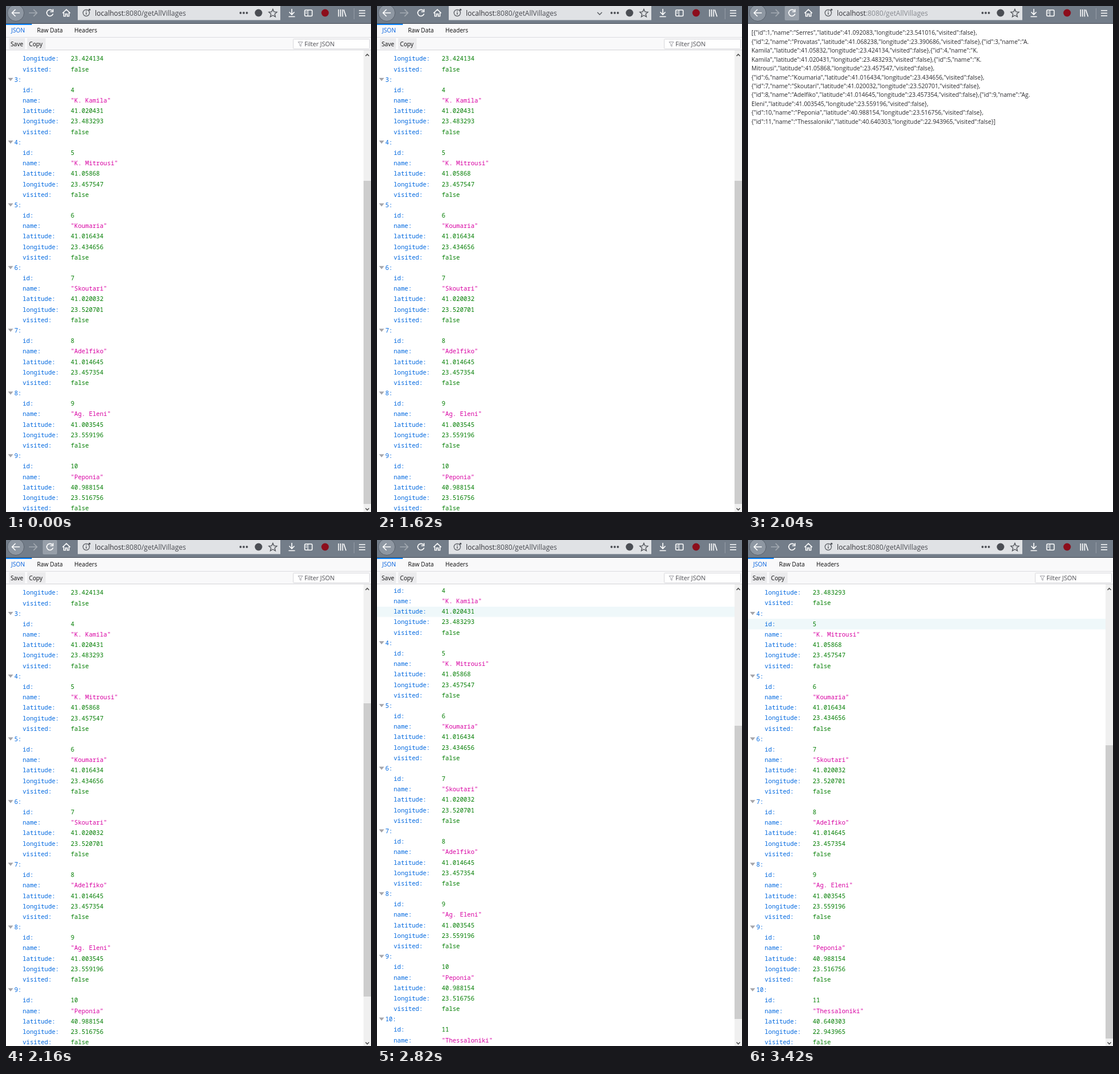
Write an HTML page that moves like this. It is 636 px wide and 880 px high and loops after 4140 ms.

```html
<!DOCTYPE html>
<html lang="en">
<head>
<meta charset="utf-8">
<title>JSON viewer reload</title>
<style>
html, body { margin: 0; width: 100%; height: 100%; overflow: hidden; background: #fff; }
svg { display: block; width: 636px; height: 880px; }
text { white-space: pre; }
.ui { font: 10.2px "Open Sans", sans-serif; fill: #0c0c0d; }
.url { font: 12px "Open Sans", sans-serif; fill: #303035; }
.raw { font: 10.27px "Open Sans", sans-serif; fill: #2a2a2e; }
.row { font: 10.58px "Noto Sans Mono", "DejaVu Sans Mono", monospace; }
.key { fill: #0068e0; }
.num { fill: #007d00; }
.str { fill: #d800a2; }
.line { fill: none; stroke: #fff; stroke-width: 1.6; }
.dark { stroke: #55585e; stroke-width: 1.4; }

.chevron, .hot, .path, .viewer, .page, .list, .hover, .thumb {
  animation: 4140ms step-end infinite;
}
.chevron { animation-name: chevron; }
.hot { animation-name: hot; }
.path { animation-name: path; }
.viewer { animation-name: viewer; }
.page { animation-name: page; }
.list { animation-name: scroll; }
.hover { animation-name: hover; }
.thumb { animation-name: thumb; }

@keyframes chevron {
  0%, 40.57% { opacity: 0; }
  36.23% { opacity: .4; }
  37.68% { opacity: .8; }
  39.13% { opacity: 1; }
}
@keyframes hot {
  0%, 60.86% { opacity: 0; }
  40.57%, 59.42% { opacity: .5; }
  42.02% { opacity: 1; }
}
@keyframes path {
  0%, 52.17% { fill: #4a4c52; }
  46.37% { fill: #86898f; }
}
@keyframes viewer {
  0%, 52.17% { visibility: visible; }
  47.82% { visibility: hidden; }
}
@keyframes page {
  0%, 52.17% { visibility: hidden; }
  47.82% { visibility: visible; }
}
@keyframes scroll {
  0% { transform: translateY(0); }
  65.21% { transform: translateY(-2px); }
  66.66% { transform: translateY(-27px); }
  68.11% { transform: translateY(-58px); }
  69.56% { transform: translateY(-84px); }
  71.01% { transform: translateY(-101px); }
  73.91%, 100% { transform: translateY(-109.1px); }
}
/* row under the pointer, in list coordinates */
@keyframes hover {
  0% { opacity: 0; transform: translateY(155.4px); }
  65.21% { opacity: 1; transform: translateY(155.4px); }
  68.11% { opacity: 1; transform: translateY(173.6px); }
  69.56% { opacity: 1; transform: translateY(209.9px); }
  71.01% { opacity: 1; transform: translateY(228.1px); }
  73.91%, 100% { opacity: 1; transform: translateY(246.3px); }
}
@keyframes thumb {
  0% { y: 304px; height: 562px; }
  52.17% { y: 284px; height: 510px; }
  65.21% { y: 285px; height: 510px; }
  66.66% { y: 302px; height: 510px; }
  68.11% { y: 323px; height: 510px; }
  69.56% { y: 340px; height: 510px; }
  71.01% { y: 352px; height: 510px; }
  73.91%, 100% { y: 357px; height: 510px; }
}
</style>
</head>
<body>
<svg viewBox="0 0 636 880">
  <defs>
    <clipPath id="panel"><rect y="77" width="623" height="803"/></clipPath>
  </defs>
  <rect width="636" height="880" fill="#fff"/>

  <g class="viewer">
    <g clip-path="url(#panel)">
      <g class="list" id="list">
        <rect class="hover" width="623" height="18.2" fill="#eff8fa"/>
      </g>
    </g>
    <rect y="31" width="636" height="46" fill="#f9f9fa"/>
    <rect y="54" width="636" height="1" fill="#dcdce0"/>
    <rect y="76" width="636" height="1" fill="#d4d4d8"/>
    <rect y="31" width="45" height="2" fill="#0a84ff"/>
    <g class="ui">
      <text x="9" y="46" style="fill:#0060df">JSON</text>
      <text x="54" y="46">Raw Data</text>
      <text x="119" y="46">Headers</text>
      <path d="M5 56h28v19H5zM37 56h32v19H37z" fill="#ebebed"/>
      <text x="8" y="69.6">Save</text>
      <text x="40" y="69.6">Copy</text>
      <rect x="500.5" y="57.5" width="133" height="17" rx="1" fill="#fff" stroke="#d7d7db"/>
      <path d="M509 62.5h8l-3 3.7v4l-2-1.2v-2.8z" fill="none" stroke="#a0a0a6"/>
      <text x="520" y="69.6" style="font-size:10.6px;fill:#4a4a50">Filter JSON</text>
    </g>
    <rect x="623" y="77" width="13" height="803" fill="#f0f0f0"/>
    <rect class="thumb" x="623" y="304" width="13" height="562" fill="#cdcdcd"/>
    <path d="M626.5 87l3-3 3 3M626.5 873.5l3 3 3-3" fill="none" stroke="#505050" stroke-width="1.6"/>
  </g>

  <g class="page raw" id="raw"></g>

  <rect width="636" height="30" fill="#737d89"/>
  <rect y="30" width="636" height="1" fill="#454b54"/>
  <rect x="125" width="353" height="24.5" fill="#e0e2e5"/>
  <rect class="hot" x="64" width="25" height="25" rx="2" fill="#979fa9"/>

  <circle cx="17" cy="12" r="14.5" fill="#8e97a2" stroke="#59616c"/>
  <g class="line">
    <path d="M24 12H10.5M16.5 6l-6 6 6 6"/>
    <path d="M40 12h13.5M48 6l6 6-6 6" opacity=".35"/>
    <path d="M80.8 8.2A5.6 5.6 0 1 0 82 13.5M82 5.5v4.5h-4.8"/>
    <path d="M98.5 12.5l6.7-6.5 6.7 6.5M100.7 11.5v6.3h3v-4h3v4h3v-6.3"/>
    <path d="M498 5v9.500M493.5 10.5l4.5 4.5 4.5-4.5M492.5 18.5h11"/>
    <rect x="520.5" y="7" width="13" height="10.5" rx="1.5"/>
    <path d="M526 7v10.5M522 10h2.5M522 12.5h2.5" stroke-width="1.2"/>
    <path d="M579.5 6v12.5M583 6v12.5M586.5 6v12.5M588.5 6.5l4 12"/>
    <path d="M615 8h11M615 12.5h11M615 17h11"/>
    <path d="M606.5 4v19" stroke-width="1" opacity=".25"/>
  </g>
  <circle cx="556" cy="12" r="6.5" fill="#8c0d1b"/>

  <g class="line dark">
    <circle cx="139.8" cy="12" r="5.6" stroke-width="1.2"/>
    <path d="M139.8 11v4M139.8 8v1.5"/>
    <path class="chevron" d="M384 11l4 4 4-4"/>
    <path d="M465 5.5l2 4.6 5 .5-3.8 3.3 1.2 4.9-4.4-2.6-4.4 2.6 1.2-4.9-3.8-3.3 5-.5z"/>
  </g>
  <circle cx="145.5" cy="6.5" r="1.8" fill="#55585e"/>
  <g fill="#4b4e54">
    <circle cx="408.7" cy="12" r="1.9"/>
    <circle cx="414.2" cy="12" r="1.9"/>
    <circle cx="419.7" cy="12" r="1.9"/>
    <circle cx="440" cy="12" r="6.5"/>
  </g>
  <text class="url" x="155" y="17.3">localhost<tspan class="path">:8080/getAllVillages</tspan></text>
</svg>
<script>
const villages = [
  ["Serres", 41.092083, 23.541016],
  ["Provatas", 41.068238, 23.390686],
  ["A. Kamila", 41.05832, 23.424134],
  ["K. Kamila", 41.020431, 23.483293],
  ["K. Mitrousi", 41.05868, 23.457547],
  ["Koumaria", 41.016434, 23.434656],
  ["Skoutari", 41.020032, 23.520701],
  ["Adelfiko", 41.014645, 23.457354],
  ["Ag. Eleni", 41.003545, 23.559196],
  ["Peponia", 40.988154, 23.516756],
  ["Thessaloniki", 40.640303, 22.943965]
].map(([name, latitude, longitude], i) =>
  ({ id: i + 1, name, latitude, longitude, visited: false }));

const NS = "http://www.w3.org/2000/svg";
const ROW = 18.18;
const list = document.getElementById("list");
const raw = document.getElementById("raw");

function add(parent, tag, attrs, content = "") {
  const el = document.createElementNS(NS, tag);
  for (const k in attrs) el.setAttribute(k, attrs[k]);
  el.textContent = content;
  parent.append(el);
}

// Tree rows; the first two villages are scrolled out of view.
villages.slice(2).forEach((village, n) => {
  let y = 18.92 + n * 6 * ROW;
  add(list, "path", { d: `M3.5 ${y - 3}h9l-4.5 5.500z`, fill: "#a5a5aa" });
  add(list, "text", { class: "row key", x: 14.5, y: y + 3.7 }, `${n + 2}:`);
  for (const [key, value] of Object.entries(village)) {
    y += ROW;
    const type = typeof value === "string" ? "str" : "num";
    add(list, "text", { class: "row key", x: 29, y: y + 3.7 }, key + ":");
    add(list, "text", { class: "row " + type, x: 112.7, y: y + 3.7 }, JSON.stringify(value));
  }
});

// Plain response: wraps at spaces, else between records.
const body = villages.map((v, i) =>
  (i && !v.name.includes(" ") ? "\n" : "") + JSON.stringify(v).replace(" ", "\n"));
`[${body.join(",")}]`.split("\n").forEach((line, i) =>
  add(raw, "text", { x: 6, y: 50.3 + i * 15.45 }, line));
</script>
</body>
</html>
```
